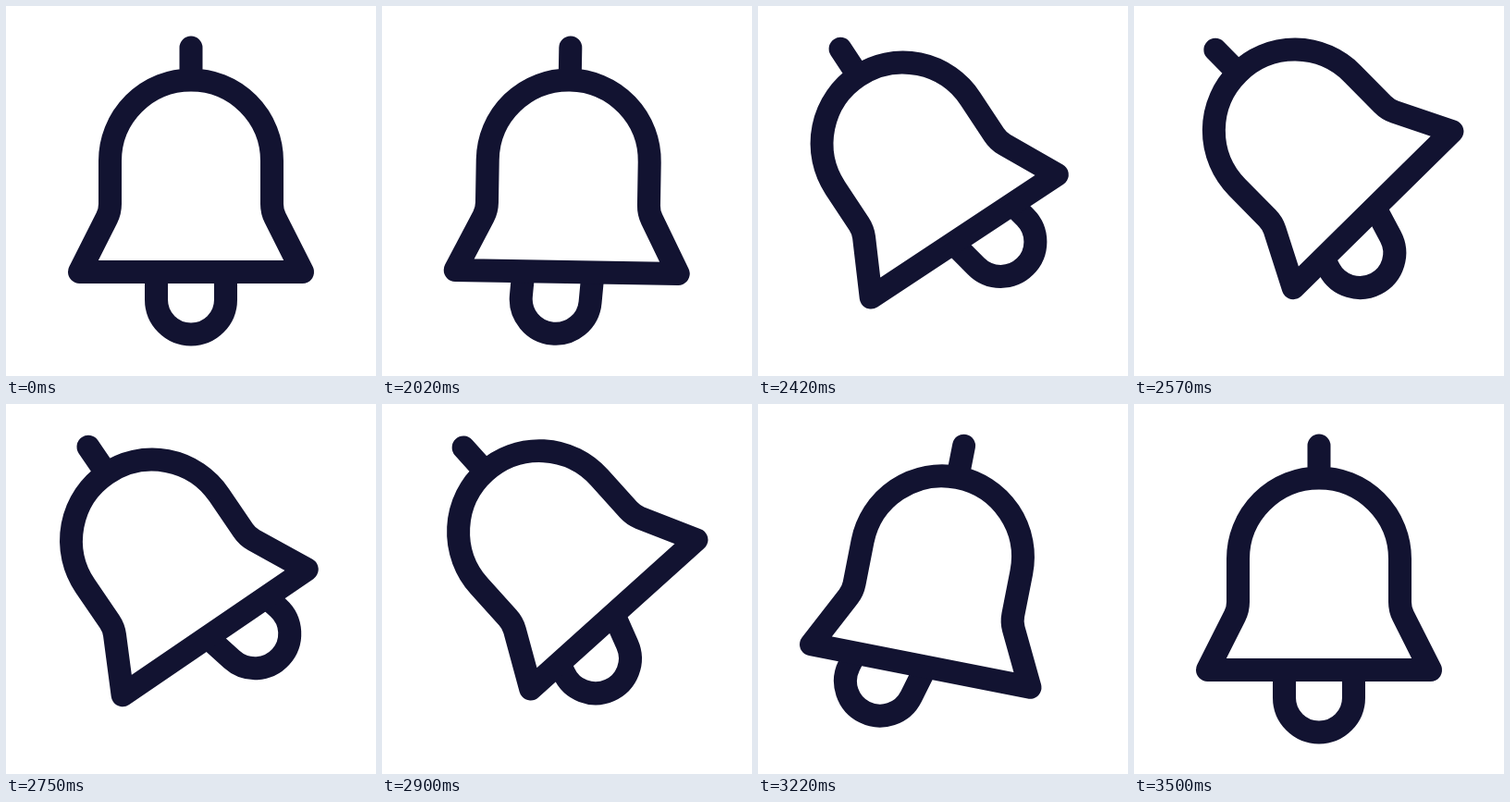
An HTML page with a canvas for the animation above (3.52 s loop, 400x400 px).

```html
<!DOCTYPE html>
<html lang="en">
<head>
<meta charset="utf-8">
<title>Ringing bell</title>
<style>
  html, body { margin: 0; width: 100%; height: 100%; overflow: hidden; background: #fff; }
  canvas { display: block; width: 100vmin; height: 100vmin; }
</style>
</head>
<body>
<canvas id="stage" width="400" height="400"></canvas>
<script>
const ctx = document.getElementById('stage').getContext('2d');
const INK = '#121331';
const LOOP = 3520, RING_START = 2000;
const RELEASE = 950, SETTLE = 550;        // ms after the ring starts, ms to come to rest
const PERIOD = 337, FIRST_PEAK = 310;     // ms
const HINGE_Y = 53, DOME_Y = 167.5, RIM_Y = 287.5;

const clamp = x => Math.min(1, Math.max(0, x));
const radians = degrees => degrees * Math.PI / 180;

// Eases from 0 to 1 after first pulling back with the given strength.
function windUp(t, duration, pull) {
  const x = clamp(t / duration);
  return x * x * (3 - 2 * x) - pull * x * (1 - x) ** 2;
}

// The bell leans over, rings around the leaning pose, then swings back to rest.
function poseAt(t) {
  const x = clamp((t - RELEASE) / SETTLE);
  const lean = (1 - x) * Math.cos(4 * x);
  const ring = clamp(t / 500) * (1 - x);
  const phase = 2 * Math.PI * (t - FIRST_PEAK) / PERIOD;
  return {
    slide: -106.5 * lean * windUp(t, 300, 0.8),
    tilt: -41.5 * lean * windUp(t, 265, 0.8) - 20 * ring * Math.cos(phase),
    swing: -20.7 * (1 - x * x) * windUp(t, 300, 3.8) * Math.sin(phase + radians(28))
  };
}

function rotateAt(x, y, degrees) {
  ctx.translate(x, y);
  ctx.rotate(radians(degrees));
  ctx.translate(-x, -y);
}

function drawBell() {
  ctx.beginPath();
  ctx.moveTo(200, 45);
  ctx.lineTo(200, 80);
  ctx.moveTo(79.5, RIM_Y);
  ctx.lineTo(109, 229);
  ctx.quadraticCurveTo(112.5, 222, 112.5, 214);
  ctx.lineTo(112.5, DOME_Y);
  ctx.arc(200, DOME_Y, 87.5, Math.PI, 0);
  ctx.lineTo(287.5, 214);
  ctx.quadraticCurveTo(287.5, 222, 291, 229);
  ctx.lineTo(320.5, RIM_Y);
  ctx.closePath();
  ctx.stroke();
}

function drawClapper(angle) {
  ctx.save();
  ctx.beginPath();
  ctx.rect(0, RIM_Y, 400, 200);
  ctx.clip();
  rotateAt(200, DOME_Y, angle);
  ctx.beginPath();
  ctx.moveTo(162.5, 262);
  ctx.lineTo(162.5, 317.5);
  ctx.arc(200, 317.5, 37.5, Math.PI, 0, true);
  ctx.lineTo(237.5, 262);
  ctx.stroke();
  ctx.restore();
}

function draw(t) {
  const { slide, tilt, swing } = poseAt(t - RING_START);
  ctx.fillStyle = '#fff';
  ctx.fillRect(0, 0, 400, 400);
  ctx.save();
  ctx.strokeStyle = INK;
  ctx.lineWidth = 25;
  ctx.lineCap = ctx.lineJoin = 'round';
  ctx.translate(slide, 0);
  rotateAt(200, HINGE_Y, tilt);
  drawClapper(swing);
  drawBell();
  ctx.restore();
}

const start = performance.now();
function tick() {
  draw((performance.now() - start) % LOOP);
  requestAnimationFrame(tick);
}
tick();
</script>
</body>
</html>
```
